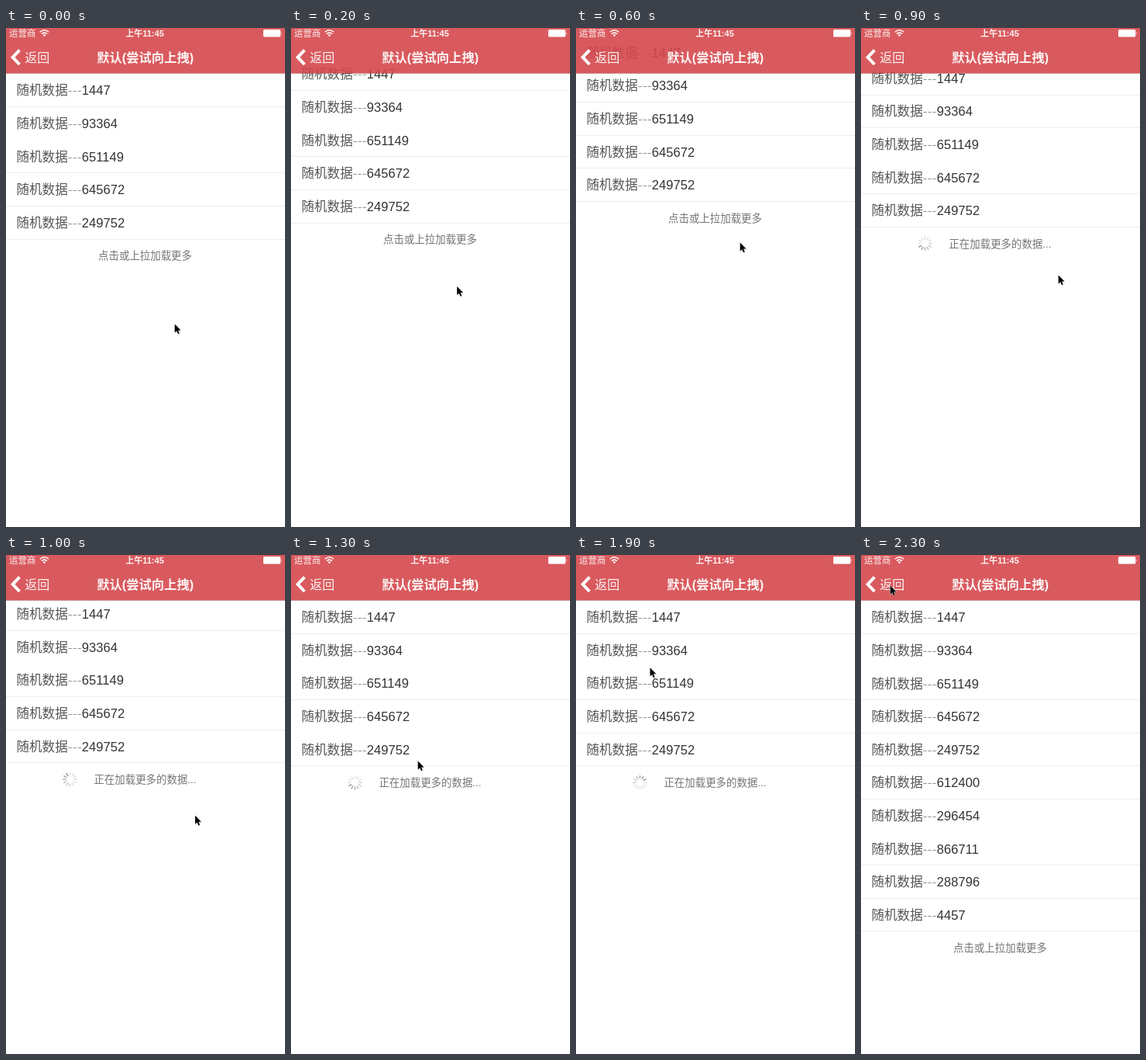
An HTML page for the animation above (2.4 s loop, 360 by 643 pixels).

```html
<!DOCTYPE html>
<html lang="zh-CN">
<head>
<meta charset="utf-8">
<style>
  html, body { margin: 0; width: 100%; height: 100%; overflow: hidden; background: #fff; }
  svg { display: block; width: 360px; height: 643px; }
  text { font-family: "Liberation Sans", "Noto Sans CJK SC", "Noto Sans CJK", sans-serif; }
  .row { font-size: 16.6px; font-weight: 300; fill: #333; }
  .name { font-family: "DejaVu Sans", "Noto Sans CJK SC", "Noto Sans CJK", sans-serif; fill: #555; }
  .footer { font-size: 13.45px; fill: #757575; text-anchor: middle; }
  .bar text { fill: #fff; fill-opacity: .93; }
  .middle { text-anchor: middle; font-weight: bold; }
</style>
</head>
<body>
<svg viewBox="0 0 360 643">
  <g id="list"></g>
  <text id="footer" class="footer" x="179.5"></text>
  <g id="spinner" stroke="#858585" stroke-width="1.4" stroke-linecap="round"></g>
  <g class="bar">
    <path d="M0 0H360V58.5H0Z" fill="#d5494d" fill-opacity=".9"/>
    <path d="M0 58.5H360V59H0Z" fill-opacity=".3"/>
    <text x="4" y="11" font-size="11.5">运营商</text>
    <g fill="none" stroke="#fff" stroke-width="1.5">
      <path d="M43.8 5.2Q49.5 .4 55.2 5.2M46 7.6Q49.5 4.6 53 7.6"/>
      <path d="M47.6 9L49.5 11.2L51.4 9Q49.5 7.6 47.6 9Z" fill="#fff" stroke="none"/>
      <path d="M17.5 28.5L8.7 37.7L17.5 47" stroke-width="4"/>
    </g>
    <text class="middle" x="179" y="11" font-size="11">上午11:45</text>
    <rect x="332" y="2" width="22.3" height="9.6" rx="1.5" fill="#fff"/>
    <path d="M354.9 5.2Q356.6 6.8 354.9 8.4Z" fill="#fff"/>
    <text x="24.3" y="43.6" font-size="16">返回</text>
    <text class="middle" x="179.7" y="43.6" font-size="16.3">默认(尝试向上拽)</text>
  </g>
  <g id="cursor">
    <g transform="translate(.7 1.4) scale(.85)">
      <path d="M1 2V15L4 12.3L6 17L8.2 16L6.2 11.5H10.3Z" opacity=".13"/>
      <path d="M0 0V13L3 10.3L5 15L7.2 14L5.2 9.5H9.3Z" stroke="#fff" paint-order="stroke"/>
    </g>
  </g>
</svg>
<script>
const LOOP = 2400, STEP = 100, PITCH = 42.6, FIRST_LINE = 101.1;
const RELEASE = 800, LOAD_START = 900, LOAD_END = 2100;
const GRAB_Y = 371, VIEW_HEIGHT = 584, SETTLE = 74.25;
const values = [1447, 93364, 651149, 645672, 249752, 612400, 296454, 866711, 288796, 4457];

// Pointer way points: time, x, y
const path = [
  [0, 217, 380], [400, 210, 283], [600, 211, 275], [700, 213, 250], [RELEASE, 213, 250],
  [900, 254, 317], [1050, 238, 343], [1300, 163, 264], [1400, 94, 133], [2000, 95, 146], [2300, 37, 38]
];

const byId = id => document.getElementById(id);
const list = byId('list'), footer = byId('footer'), spinner = byId('spinner'), cursor = byId('cursor');

function add(parent, tag, attrs, text = '') {
  const node = document.createElementNS('http://www.w3.org/2000/svg', tag);
  for (const name in attrs) node.setAttribute(name, attrs[name]);
  node.textContent = text;
  return parent.appendChild(node);
}

const rows = values.map(value => {
  const group = add(list, 'g', {});
  const label = add(group, 'text', { class: 'row', x: 13.4 });
  add(label, 'tspan', { class: 'name' }, '随机数据---');
  add(label, 'tspan', {}, value);
  const line = add(group, 'rect', { width: 360, height: 1, fill: '#ededed' });
  return { group, label, line };
});

const spokes = Array.from({ length: 12 }, (_, i) =>
  add(spinner, 'path', { d: 'M0 -5.4V-8.8', transform: `rotate(${i * 30})` }));

function pointer(t) {
  const next = Math.max(1, path.findIndex(([time]) => time >= t));
  const [t0, x0, y0] = path[next - 1], [t1, x1, y1] = path[next];
  const k = (t - t0) / (t1 - t0);
  return [x0 + (x1 - x0) * k, y0 + (y1 - y0) * k];
}

// Rubber-band pull while dragging, exponential return after release
function scrollAt(t) {
  const pull = .55 * Math.max(0, GRAB_Y - pointer(Math.min(t, RELEASE))[1]);
  return pull / (1 + pull / VIEW_HEIGHT) * Math.exp(-Math.max(0, t - RELEASE) / SETTLE);
}

function draw(t) {
  const [x, y] = pointer(t), scroll = scrollAt(t);
  const loading = t >= LOAD_START && t < LOAD_END;
  const count = t < LOAD_END ? 5 : 10;

  rows.forEach(({ group, label, line }, i) => {
    const lineY = FIRST_LINE + PITCH * i - scroll, part = lineY - Math.floor(lineY);
    group.style.display = i < count ? '' : 'none';
    label.setAttribute('y', lineY - 14.8);
    line.setAttribute('y', Math.round(lineY));
    // Hairlines drop out between sampled pixel rows
    line.style.display = part > .57 && part < .83 ? 'none' : '';
  });

  const middle = FIRST_LINE + PITCH * (count - .5) - scroll + .5;
  footer.setAttribute('y', middle + 4.8);
  footer.textContent = loading ? '正在加载更多的数据...' : '点击或上拉加载更多';
  spinner.style.display = loading ? '' : 'none';
  spinner.setAttribute('transform', `translate(82.5 ${middle})`);
  const head = 8 + (t - LOAD_START) / STEP * 3;
  spokes.forEach((spoke, i) => {
    const age = ((head - i) % 12 + 12) % 12;
    spoke.setAttribute('opacity', Math.max(.25, .9 - age * .11));
  });
  cursor.setAttribute('transform', `translate(${x} ${y})`);
}

function tick() {
  draw(Math.floor(performance.now() % LOOP / STEP) * STEP);
  requestAnimationFrame(tick);
}
tick();
</script>
</body>
</html>
```
